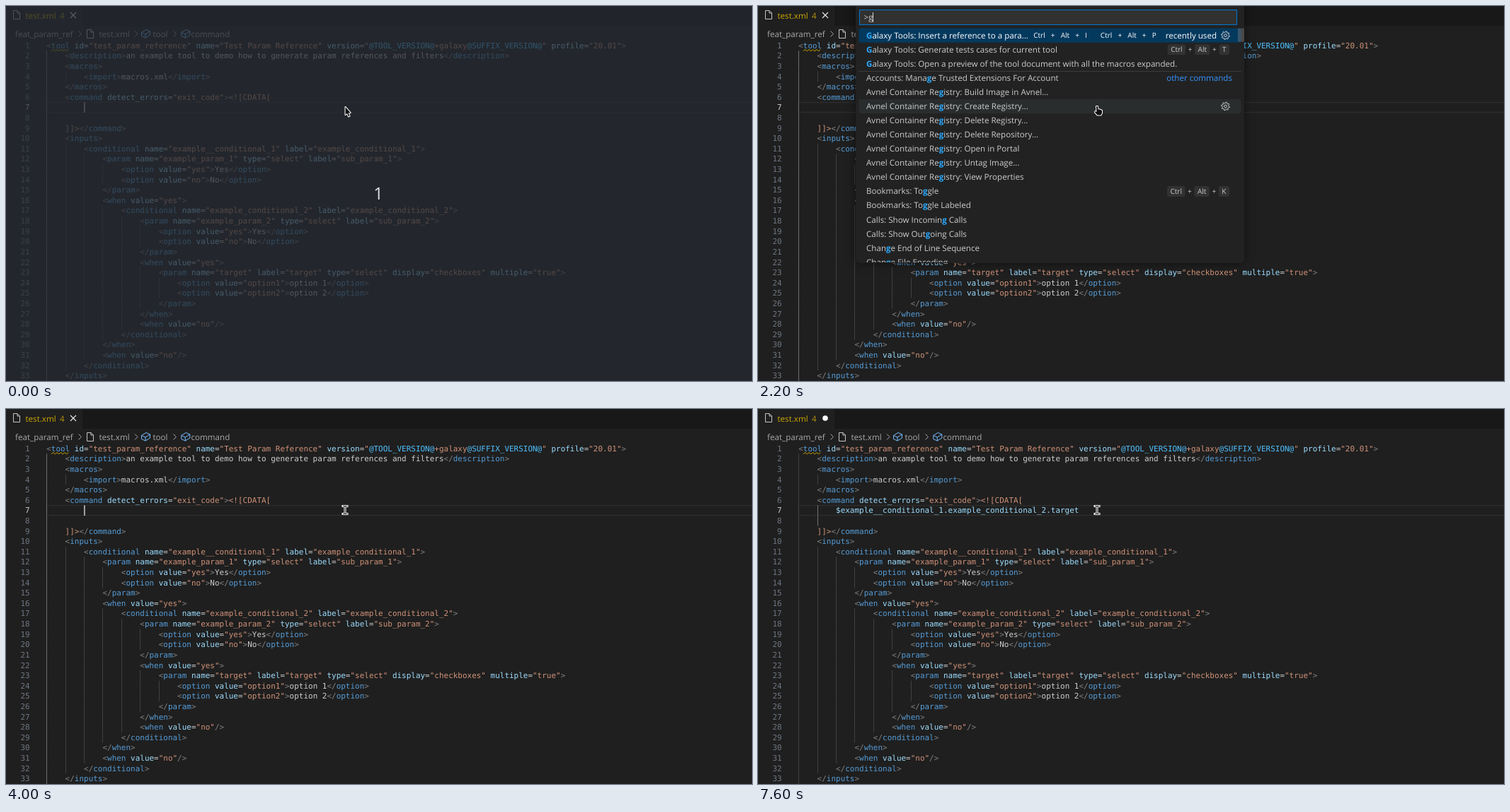
An HTML page with a canvas that plays this animation: 1054 by 531 pixels, repeating every 8000 ms.

```html
<!DOCTYPE html>
<html lang="en">
<head>
<meta charset="utf-8">
<title>Insert a parameter reference</title>
<style>
  html, body { margin: 0; width: 100%; height: 100%; overflow: hidden; background: #1f1f1f; }
  canvas { display: block; width: 100%; height: 100%; }
</style>
</head>
<body>
<canvas id="stage" width="1054" height="531"></canvas>
<script>
const ctx = document.getElementById('stage').getContext('2d');
const W = 1054, H = 531, LOOP = 8000;
const UI = '"Open Sans", "Noto Sans", sans-serif';
const UI_FONT = `11.6px ${UI}`;
const BOLD_FONT = `bold 11.6px ${UI}`;
const KEY_FONT = `10px ${UI}`;
const CODE_FONT = '10.97px "DejaVu Sans Mono", monospace';

const CODE_X = 57.2, COL = 6.604, LINE_TOP = 48.6, LINE_H = 14.61, INDENT = 4 * COL;
const BOX_L = 138, BOX_R = 687, ROW_H = 20.07;
const REFERENCE = '$example__conditional_1.example_conditional_2.target';

const code = `<tool id="test_param_reference" name="Test Param Reference" version="@TOOL_VERSION@+galaxy@SUFFIX_VERSION@" profile="20.01">
    <description>an example tool to demo how to generate param references and filters</description>
    <macros>
        <import>macros.xml</import>
    </macros>
    <command detect_errors="exit_code"><![CDATA[


    ]]></command>
    <inputs>
        <conditional name="example__conditional_1" label="example_conditional_1">
            <param name="example_param_1" type="select" label="sub_param_1">
                <option value="yes">Yes</option>
                <option value="no">No</option>
            </param>
            <when value="yes">
                <conditional name="example_conditional_2" label="example_conditional_2">
                    <param name="example_param_2" type="select" label="sub_param_2">
                        <option value="yes">Yes</option>
                        <option value="no">No</option>
                    </param>
                    <when value="yes">
                        <param name="target" label="target" type="select" display="checkboxes" multiple="true">
                            <option value="option1">option 1</option>
                            <option value="option2">option 2</option>
                        </param>
                    </when>
                    <when value="no"/>
                </conditional>
            </when>
            <when value="no"/>
        </conditional>
    </inputs>`.split('\n');

// Square brackets mark the letters that match the query.
const registry = 'Avnel Container Re[g]istry: ';
const assistant = '[Gi]nvod Aidroft: ';
const pulls = '[Gi]nvod [P]ull Requests: ';
const item = (text, extra = {}) => ({ text, ...extra });

const commandsG = [
  item('[G]alaxy Tools: Insert a reference to a para...', { keys: 'Ctrl Alt I|Ctrl Alt P', tag: 'recently used' }),
  item('[G]alaxy Tools: Generate tests cases for current tool', { keys: 'Ctrl Alt T' }),
  item('[G]alaxy Tools: Open a preview of the tool document with all the macros expanded.'),
  item('Accounts: Mana[g]e Trusted Extensions For Account', { tag: 'other commands' }),
  ...['Build Image in Avnel...', 'Create Registry...', 'Delete Registry...', 'Delete Repository...',
    'Open in Portal', 'Untag Image...', 'View Properties'].map(s => item(registry + s)),
  item('Bookmarks: To[g]gle', { keys: 'Ctrl Alt K' }),
  item('Bookmarks: To[g]gle Labeled'),
  item('Calls: Show Incomin[g] Calls'),
  item('Calls: Show Out[g]oing Calls'),
  item('Chan[g]e End of Line Sequence'),
  item('Chan[g]e File Encoding')
];

const commandsGip = [
  item('[G]alaxy Tools: [I]nsert a reference to a [p]ar...', { keys: 'Ctrl Alt I|Ctrl Alt P', tag: 'recently used' }),
  item('Dev Containers: Clone [Gi]nvod [P]ull Request in Container Volume...', { tag: 'other commands' }),
  item(assistant + 'Accept [p]anel suggestion at the cursor', { keys: 'Ctrl Shift 7' }),
  item(assistant + 'Navigate to the next [p]anel suggestion'),
  item(assistant + 'Navigate to the [p]revious panel suggestion'),
  item(assistant + 'Open Completions [P]anel', { keys: 'Ctrl Enter' }),
  ...['Checkout Pull Request', 'Delete local branches and remotes', 'Diff Comment with HEAD',
    'Focus on Issues View', 'Focus on Pull Requests View', 'Resolve Conversation'].map(s => item(pulls + s)),
  item(pulls + 'Unresolve Conversation', { desc: 'pr.unresolveReviewThread' }),
  item(pulls + 'Unresolve Conversation', { desc: 'pr.unresolveReviewThreadFromView' }),
  item('[Gi]tLens: Focus on Cloud [P]atches View'),
  item('[Gi]tLens: Hide [P]ro Features'),
  item('[Gi]tLens: [P]review Pro')
];

const references = ['1.example_param_1', '1.example_conditional_2.example_param_2', '1.example_conditional_2.target']
  .map(s => item('$example__condi[t]ional_' + s));
const targetOnly = [item('$example__conditional_1.example_conditional_2.[ta]rget')];

// Each state holds until the next one starts; no items means the picker is closed.
const states = [
  { from: 0 },
  { from: 1300, query: '>', items: commandsG, thumb: 19 },
  { from: 2200, query: '>g', items: commandsG, thumb: 19 },
  { from: 2300, query: '>gi', items: commandsGip, thumb: 110 },
  { from: 2500, query: '>gip', items: commandsGip, thumb: 279 },
  { from: 4000 },
  { from: 4100, query: '', items: references, titled: true },
  { from: 6000, query: 't', items: references, titled: true },
  { from: 6300, query: 'ta', items: targetOnly, titled: true },
  { from: 7100 }
];
const caretOff = [[700, 1200], [1900, 2200], [3000, 3500], [4600, 5200], [5800, 6000], [6900, 7100], [7600, 8000]];

function rect(x, y, w, h, fill, r = 0) {
  ctx.fillStyle = fill;
  ctx.beginPath();
  ctx.roundRect(x, y, w, h, r);
  ctx.fill();
}

function text(s, x, y, color, font = UI_FONT, align = 'left') {
  ctx.font = font;
  ctx.fillStyle = color;
  ctx.textAlign = align;
  ctx.fillText(s, x, y);
  return ctx.measureText(s).width;
}

function path(points, color, width = 1, close = false) {
  ctx.beginPath();
  points.forEach(([x, y]) => ctx.lineTo(x, y));
  if (close) ctx.closePath();
  ctx.strokeStyle = color;
  ctx.lineWidth = width;
  ctx.stroke();
}

function width(s, font = UI_FONT) {
  ctx.font = font;
  return ctx.measureText(s).width;
}

function fileIcon(x, y) {
  path([[x, y], [x + 5.5, y], [x + 9, y + 3.5], [x + 9, y + 12], [x, y + 12]], '#c5c5c5', 1, true);
  path([[x + 5.5, y], [x + 5.5, y + 3.5], [x + 9, y + 3.5]], '#c5c5c5');
}

function cubeIcon(x, y) {
  const c = '#75beff';
  path([[x, y + 4], [x + 6.5, y], [x + 12, y + 2.5], [x + 12, y + 7.5], [x + 5.5, y + 11.5], [x, y + 9]], c, 1, true);
  path([[x, y + 4], [x + 5.5, y + 6.5], [x + 12, y + 2.5]], c);
  path([[x + 5.5, y + 6.5], [x + 5.5, y + 11.5]], c);
}

function gearIcon(x, y) {
  const points = [];
  for (let i = 0; i < 32; i++) {
    const a = (i + 0.5) * Math.PI / 16, r = i % 4 < 2 ? 5.9 : 4.3;
    points.push([x + r * Math.cos(a), y + r * Math.sin(a)]);
  }
  path(points, '#d0d0d0', 1, true);
  ctx.beginPath();
  ctx.arc(x, y, 1.9, 0, 7);
  ctx.stroke();
}

function drawHeader(dirty) {
  rect(108, 0, W, 28, '#181818');
  fileIcon(10.5, 6.5);
  text('test.xml', 27.5, 17.5, '#cca700');
  text('4', 76, 17.5, '#b39409');
  if (dirty) {
    rect(91.2, 9.2, 7.6, 7.6, '#ffffff', 3.8);
  } else {
    path([[91, 9], [99, 17]], '#e8e8e8', 1.1);
    path([[99, 9], [91, 17]], '#e8e8e8', 1.1);
  }
  const grey = '#a9a9a9';
  text('feat_param_ref', 13, 43.5, grey);
  fileIcon(114.5, 33.5);
  text('test.xml', 131.5, 43.5, grey);
  cubeIcon(191.5, 33.5);
  text('tool', 207.5, 43.5, grey);
  cubeIcon(247.8, 33.5);
  text('command', 261.5, 43.5, grey);
  for (const x of [102.5, 182, 236.5]) path([[x, 35.5], [x + 4, 39.5], [x, 43.5]], grey);
}

function tokens(line) {
  const out = [];
  const rule = /(<!\[CDATA\[|\]\]>)|(<\/?)(\w+)|(\/?>)|(\s+)|(\w+)(=)("[^"]*")|([^<>]+)/g;
  for (const m of line.matchAll(rule)) {
    const [, cdata, open, tag, close, space, attr, eq, value, plain] = m;
    if (cdata) out.push([cdata, '#ce9178']);
    if (open) out.push([open, '#808080'], [tag, '#569cd6']);
    if (close) out.push([close, '#808080']);
    if (space) out.push([space, '#cccccc']);
    if (attr) {
      out.push([attr, '#9cdcfe'], [eq, '#cccccc']);
      for (const part of value.split(/(@[A-Z_]+@)/)) out.push([part, part[0] === '@' ? '#4fc1ff' : '#ce9178']);
    }
    if (plain) out.push([plain, '#cccccc']);
  }
  return out;
}
const codeTokens = code.map(tokens);

function drawEditor(inserted, settled) {
  const lineY = i => LINE_TOP + i * LINE_H;
  ctx.strokeStyle = '#2d2d2d';
  ctx.lineWidth = 1.4;
  ctx.strokeRect(CODE_X, 136.6, W, 14);

  code.forEach((line, i) => {
    const blank = line === '';
    const level = blank ? (settled ? 2 : 1) : line.search(/\S/) / 4;
    for (let k = 0; k < level; k++) {
      const active = settled ? blank && k === 1 : k === 0;
      rect(Math.round(CODE_X + k * INDENT), lineY(i), 1, LINE_H, active ? '#707070' : '#404040');
    }
    const base = Math.round(lineY(i) + 11.1);
    text(i + 1, 33.6, base, i === 6 ? '#cccccc' : '#6e7681', CODE_FONT, 'right');
    let col = 0;
    for (const [s, color] of codeTokens[i]) {
      if (s.trim()) text(s, CODE_X + col * COL, base, color, CODE_FONT);
      col += s.length;
    }
    if (inserted && i === 6) text(REFERENCE, CODE_X + 8 * COL, base, '#9cdcfe', CODE_FONT);
  });

  const wave = [];
  for (let x = 64; x <= 90.5; x += 2.7) wave.push([x, wave.length % 2 ? 61.6 : 63.8]);
  path(wave, '#cca700', 1);
}

function drawKeys(keys, right, y, selected) {
  const color = selected ? '#ffffff' : '#cccccc';
  for (const chord of keys.split('|').reverse()) {
    chord.split(' ').reverse().forEach((key, i) => {
      if (i) {
        text('+', right - 6.5, y + 3.7, color, KEY_FONT, 'center');
        right -= 13;
      }
      const w = width(key, KEY_FONT) + 9;
      if (!selected) rect(right - w, y - 7.5, w, 15, 'rgba(128,128,128,.17)', 3);
      text(key, right - w / 2, y + 3.7, color, KEY_FONT, 'center');
      right -= w;
    });
    right -= 10;
  }
}

function drawLabel(s, x, y, color, query) {
  s.split(/[\[\]]/).forEach((part, i) => {
    const hit = i % 2 && [...part.toLowerCase()].every(c => query.includes(c));
    x += hit ? text(part, x, y, '#2aaaff', BOLD_FONT) : text(part, x, y, color);
  });
  return x;
}

function drawRow(row, i, top, state) {
  const y = top + i * ROW_H, mid = y + ROW_H / 2, base = Math.round(mid + 4);
  const selected = i === 0, hover = i === 5, gear = !state.titled && (selected || hover);
  const color = selected ? '#ffffff' : '#cccccc';
  if (selected || hover) rect(142.5, y, 540, ROW_H, selected ? '#04395e' : '#2a2d2e', 3);
  if (row.tag && !selected) rect(142.5, Math.round(y), 540, 1, '#3c3c3c');
  const end = drawLabel(row.text, 153, base, color, state.query);
  if (row.desc) text(row.desc, end + 6, base, '#989898', `10.4px ${UI}`);
  let right = gear ? 643 : 666;
  if (row.tag) {
    const edge = gear ? 648 : 670;
    text(row.tag, edge, base, selected ? '#ffffff' : '#3794ff', UI_FONT, 'right');
    right = edge - width(row.tag) - 8.5;
  }
  if (row.keys) drawKeys(row.keys, right, mid, selected);
  if (gear) gearIcon(660.5, mid);
}

function drawPicker(state, t, caret) {
  const { query, items, titled, thumb } = state;
  const inputY = titled ? 27 : 5, top = inputY + 26.6;
  const bottom = titled ? top + items.length * ROW_H + 4.5 : 364;

  ctx.save();
  ctx.shadowColor = 'rgba(0,0,0,.5)';
  ctx.shadowBlur = 13;
  rect(BOX_L, -20, BOX_R - BOX_L, bottom + 20, '#222222', 5);
  ctx.restore();

  if (titled) {
    rect(BOX_L, 0, BOX_R - BOX_L, 19, '#393939');
    text('Select a parameter reference to insert', 412.3, 13, '#cccccc', UI_FONT, 'center');
  }
  rect(143.5, inputY, 533, 22, '#313131', 2);
  ctx.strokeStyle = '#0078d4';
  ctx.lineWidth = 1;
  ctx.strokeRect(143.5, inputY + 0.5, 533, 21);
  text(query, 149.5, inputY + 15, '#cccccc');
  if (caret) rect(Math.round(149.3 + width(query)), inputY + 4, 1, 14, '#d4d4d4');

  ctx.save();
  ctx.beginPath();
  ctx.rect(BOX_L, 0, BOX_R - BOX_L, bottom - 1);
  ctx.clip();
  items.forEach((row, i) => drawRow(row, i, top, state));
  ctx.restore();
  if (thumb) rect(678, top, 9, thumb, 'rgba(121,121,121,.45)');

  if (!titled && t >= 3200) {
    const p = (t - 3200) / 4000, unit = (BOX_R - BOX_L) * 0.02, w = unit * (1 + 4 * p);
    rect(BOX_L + p * 50 * unit + (unit - w) / 2, 29, w, 2, '#0078d4');
  }
}

function drawPointer(points) {
  ctx.lineJoin = 'round';
  path(points, '#ffffff', 2, true);
  ctx.fillStyle = '#101010';
  ctx.fill();
  ctx.lineJoin = 'miter';
}

function drawBeam() {
  const strokes = [[[476, 137.5], [482, 137.5]], [[479, 137.5], [479, 148.5]], [[476, 148.5], [482, 148.5]]];
  ctx.lineCap = 'square';
  for (const [color, w] of [['#ffffff', 3], ['#101010', 1]]) strokes.forEach(s => path(s, color, w));
  ctx.lineCap = 'butt';
}

const drawHand = () => drawPointer([[478, 142], [480, 142], [480.5, 146.5], [483, 146.5], [486, 148],
  [486, 151.5], [484.5, 154.5], [479.5, 154.5], [476, 150.5], [476.5, 149], [478.5, 150]]);

const drawArrow = () => drawPointer([[479.5, 143], [479.5, 154], [482, 152], [484, 156.5],
  [485.5, 155.8], [483.7, 151.5], [486.7, 151.2]]);

function drawCountdown() {
  rect(0, 0, W, H, 'rgba(37,43,51,.73)');
  text('1', 526, 274, '#dfe2e4', `24px ${UI}`, 'center');
  drawArrow();
}

function draw(t) {
  const state = states.findLast(s => t >= s.from);
  const caret = !caretOff.some(([a, b]) => t >= a && t < b);
  const inserted = t >= 7100, settled = t >= 7200;
  ctx.textRendering = 'geometricPrecision';
  rect(0, 0, W, H, '#1f1f1f');
  drawHeader(settled);
  drawEditor(inserted, settled);
  if (state.items) {
    drawPicker(state, t, caret);
  } else if (caret) {
    const col = 8 + (inserted ? REFERENCE.length : 0);
    rect(Math.floor(CODE_X + col * COL), 136.3, 1.8, LINE_H, '#aeafad');
  }
  if (t < 100) drawCountdown();
  else if (state.items && !state.titled) drawHand();
  else drawBeam();
}

const start = performance.now();
function tick() {
  draw((performance.now() - start) % LOOP);
  requestAnimationFrame(tick);
}
tick();
</script>
</body>
</html>
```
